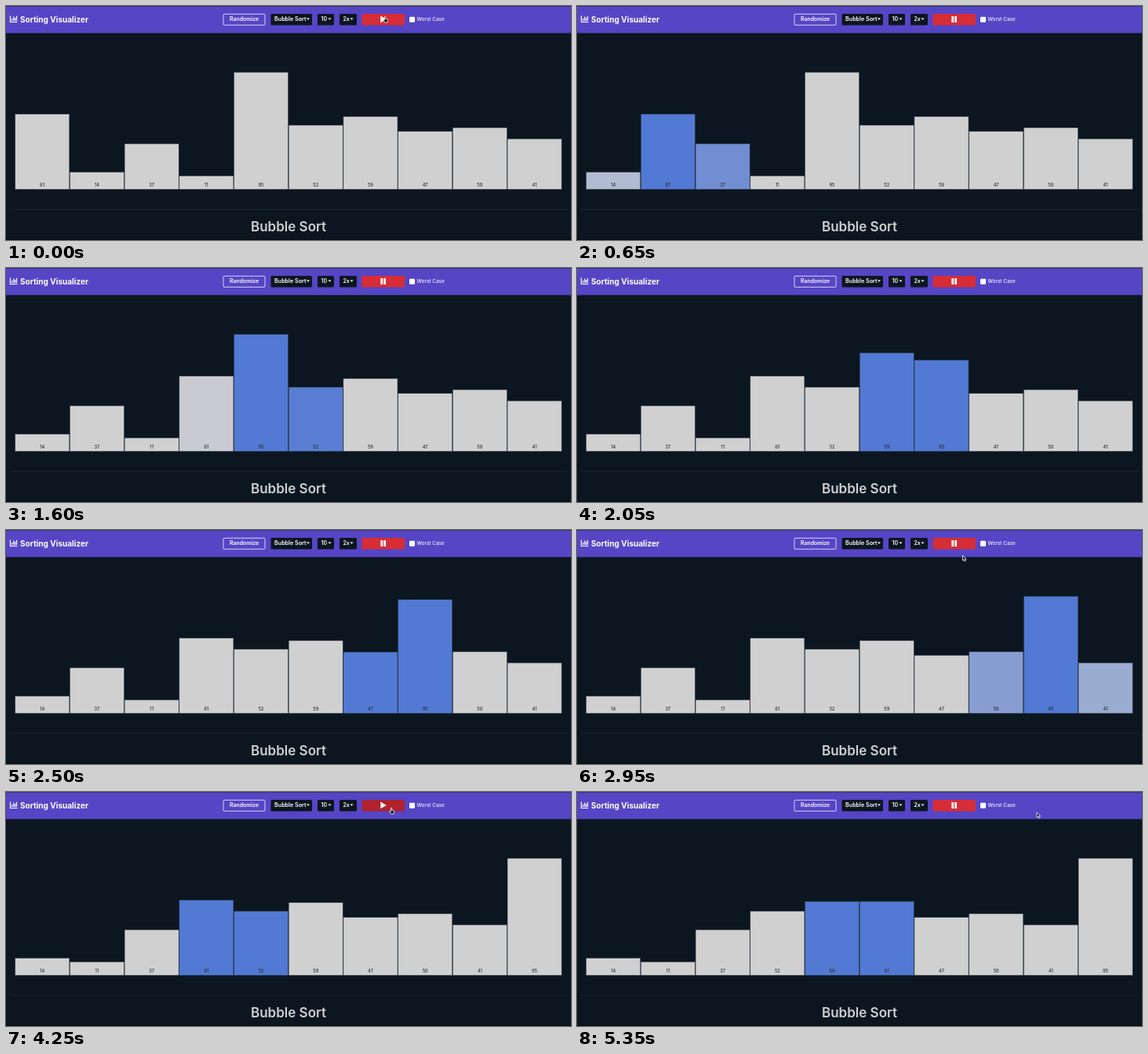
Animation of 720 by 298 pixels, one loop 5.4 s. Source, as an HTML page:

```html
<!DOCTYPE html>
<html lang="en">
<head>
<meta charset="utf-8">
<title>Sorting Visualizer</title>
<style>
  html, body { margin: 0; width: 100%; height: 100%; overflow: hidden; background: #0b1620; }
  svg { display: block; width: 720px; height: 298px; font-family: Inter, "Open Sans", sans-serif; }
  .ui { fill: #fff; font-size: 6.9px; font-weight: 600; }
  .value { fill: #25282c; font-size: 5.6px; font-weight: 500; text-anchor: middle; }
  .mid { text-anchor: middle; }
  .dark { fill: #0b1620; }
  .hidden { visibility: hidden; }
</style>
</head>
<body>
<svg viewBox="0 0 720 298">
  <rect class="dark" width="720" height="298"/>
  <rect width="720" height="34.5" fill="#5645c5"/>
  <rect width="720" height="1" fill="#3a3770"/>

  <path d="M5.5 12.5V20.5H14.5" fill="none" stroke="#fff" stroke-width="1.2"/>
  <path d="M7.8 19V16M9.8 19V13.5M11.6 19V15M13.5 19V12.8" stroke="#fff" stroke-width="1.2"/>
  <text x="18" y="20.6" fill="#fff" font-size="10" font-weight="700">Sorting Visualizer</text>

  <rect x="277" y="10.3" width="53" height="14" rx="1" fill="none" stroke="#e4e1f6" stroke-width=".9"/>
  <text class="ui mid" x="303.6" y="19.4">Randomize</text>

  <g class="dark">
    <rect x="337.5" y="10" width="52.5" height="14.5" rx="1.5"/>
    <rect x="397" y="10" width="21" height="14.5" rx="1.5"/>
    <rect x="425" y="10" width="22" height="14.5" rx="1.5"/>
  </g>
  <g class="ui">
    <text x="342" y="19.4" font-size="7.2">Bubble Sort</text>
    <text x="401.5" y="19.4">10</text>
    <text x="429.5" y="19.4">2x</text>
    <path d="M383 15.6h4l-2 2.2zM410.5 15.6h4l-2 2.2zM438.5 15.6h4l-2 2.2z"/>
  </g>

  <rect id="button" x="453.5" y="10" width="54.5" height="14.5" rx="1.5"/>
  <path id="play" d="M477.3 12.6V21.2L484.8 16.9z" fill="#fff"/>
  <path id="pause" d="M477.3 13h2.8v8h-2.8zM481.2 13h2.8v8h-2.8z" fill="#fff"/>

  <rect x="514" y="13.7" width="7" height="7" rx="1.3" fill="#fff"/>
  <text x="523.5" y="19.2" fill="#f1effb" font-size="6.4" font-weight="500">Worst Case</text>

  <g id="bars"></g>

  <rect x="4" y="258.5" width="712" height="1" fill="#1a2530"/>
  <text class="mid" x="360" y="286.5" fill="#d0d0d0" font-size="17" font-weight="600">Bubble Sort</text>
  <rect y="297" width="720" height="1" fill="#050b11"/>

  <g stroke="#fff" stroke-width=".8" stroke-linejoin="round" fill="#111">
    <path id="arrow" d="M0 0V6.4L1.5 5.1L2.6 7.4L3.7 6.9L2.7 4.7H4.7z"/>
    <path id="hand" d="M-.6 -4Q.2 -4.8 .8 -4V-1.3L3 -.7Q3.7 -.4 3.6 .5L3 3.5H-.3L-2.2 .6Q-2.2 -.4 -1.2 0L-.6 .5z"/>
  </g>
</svg>

<script>
const LOOP = 5400, EASE_MS = 200, STEP_MS = 180;
const BASE = 233.5, LEFT = 11.4, PITCH = 69.7, UNIT = 1.57;
const GREY = [208, 208, 208], BLUE = [82, 121, 211];
const start = [61, 14, 37, 11, 95, 52, 59, 47, 50, 41];
const $ = id => document.getElementById(id);
const mix = (a, b, k) => a + (b - a) * k;

// Step clock: first pass, second pass, and the run after the pause.
function stepTime(k) {
  if (k < 17) return 200 + k * STEP_MS;
  if (k < 22) return 3240 + (k - 17) * STEP_MS;
  return 4931 + (k - 22) * STEP_MS;
}

// Each comparison is a step; each swap is one more.
function bubbleSteps(input) {
  const list = [...input], steps = [];
  const add = at => steps.push({ at, values: [...list], time: stepTime(steps.length) });
  for (let end = list.length - 1; end > 0; end--) {
    for (let j = 0; j < end; j++) {
      add(j);
      if (list[j] > list[j + 1]) {
        [list[j], list[j + 1]] = [list[j + 1], list[j]];
        add(j);
      }
    }
  }
  return steps.filter(s => s.time < LOOP);
}
const steps = bubbleSteps(start);

// The CSS "ease" curve, cubic-bezier(.25, .1, .25, 1).
function ease(x) {
  if (x <= 0) return 0;
  if (x >= 1) return 1;
  const curve = (p, q, u) => 3 * p * u * (1 - u) ** 2 + 3 * q * u * u * (1 - u) + u ** 3;
  let lo = 0, hi = 1;
  for (let i = 0; i < 20; i++) {
    const u = (lo + hi) / 2;
    if (curve(.25, .25, u) < x) lo = u; else hi = u;
  }
  return curve(.1, 1, lo);
}

function make(tag, attrs) {
  const el = document.createElementNS("http://www.w3.org/2000/svg", tag);
  for (const key in attrs) el.setAttribute(key, attrs[key]);
  return $("bars").appendChild(el);
}
const bars = start.map((_, i) => {
  const x = LEFT + i * PITCH;
  return {
    box: make("rect", { x: x + .3, width: PITCH - .6, stroke: "#26303c", "stroke-width": .5 }),
    label: make("text", { class: "value", x: x + PITCH / 2, y: 230.2 })
  };
});

function drawBar(i, t) {
  let value = start[i], old = value, valueTime = -LOOP;
  let lit = false, litTime = -LOOP;
  for (const s of steps) {
    if (s.time > t) break;
    const on = i === s.at || i === s.at + 1;
    if (on !== lit) { lit = on; litTime = s.time; }
    if (s.values[i] !== value) { old = value; value = s.values[i]; valueTime = s.time; }
  }
  const height = UNIT * mix(old, value, ease((t - valueTime) / EASE_MS));
  const fade = ease((t - litTime) / EASE_MS), blue = lit ? fade : 1 - fade;
  const { box, label } = bars[i];
  box.setAttribute("y", BASE - height);
  box.setAttribute("height", height);
  box.setAttribute("fill", `rgb(${GREY.map((c, n) => Math.round(mix(c, BLUE[n], blue)))})`);
  label.textContent = value;
}

// Pointer path as [time, x, y].
const path = [[2800, 500, 56], [2950, 491.5, 32.5], [3200, 491, 24.5], [4850, 491, 24.5], [5250, 586, 26]];
function pointer(t) {
  if (t < 100) return [483, 17.5];
  if (t < path[0][0]) return null;
  const n = path.findIndex(p => p[0] > t);
  if (n < 0) return path[path.length - 1].slice(1);
  const a = path[n - 1], b = path[n], k = (t - a[0]) / (b[0] - a[0]);
  return [mix(a[1], b[1], k), mix(a[2], b[2], k)];
}

function show(id, on) { $(id).classList.toggle("hidden", !on); }

function draw(t) {
  bars.forEach((_, i) => drawBar(i, t));
  const stopped = t < 100 || (t >= 4050 && t < 4750);
  show("play", stopped);
  show("pause", !stopped);

  const p = pointer(t);
  const over = !!p && p[0] > 453 && p[0] < 508 && p[1] < 25;
  $("button").setAttribute("fill", over && t > 100 ? "#b0232c" : "#d62d37");
  show("hand", over);
  show("arrow", p && !over);
  if (p) $(over ? "hand" : "arrow").setAttribute("transform", `translate(${p})`);
}

const origin = performance.now();
function tick() {
  draw((performance.now() - origin) % LOOP);
  requestAnimationFrame(tick);
}
tick();
</script>
</body>
</html>
```
